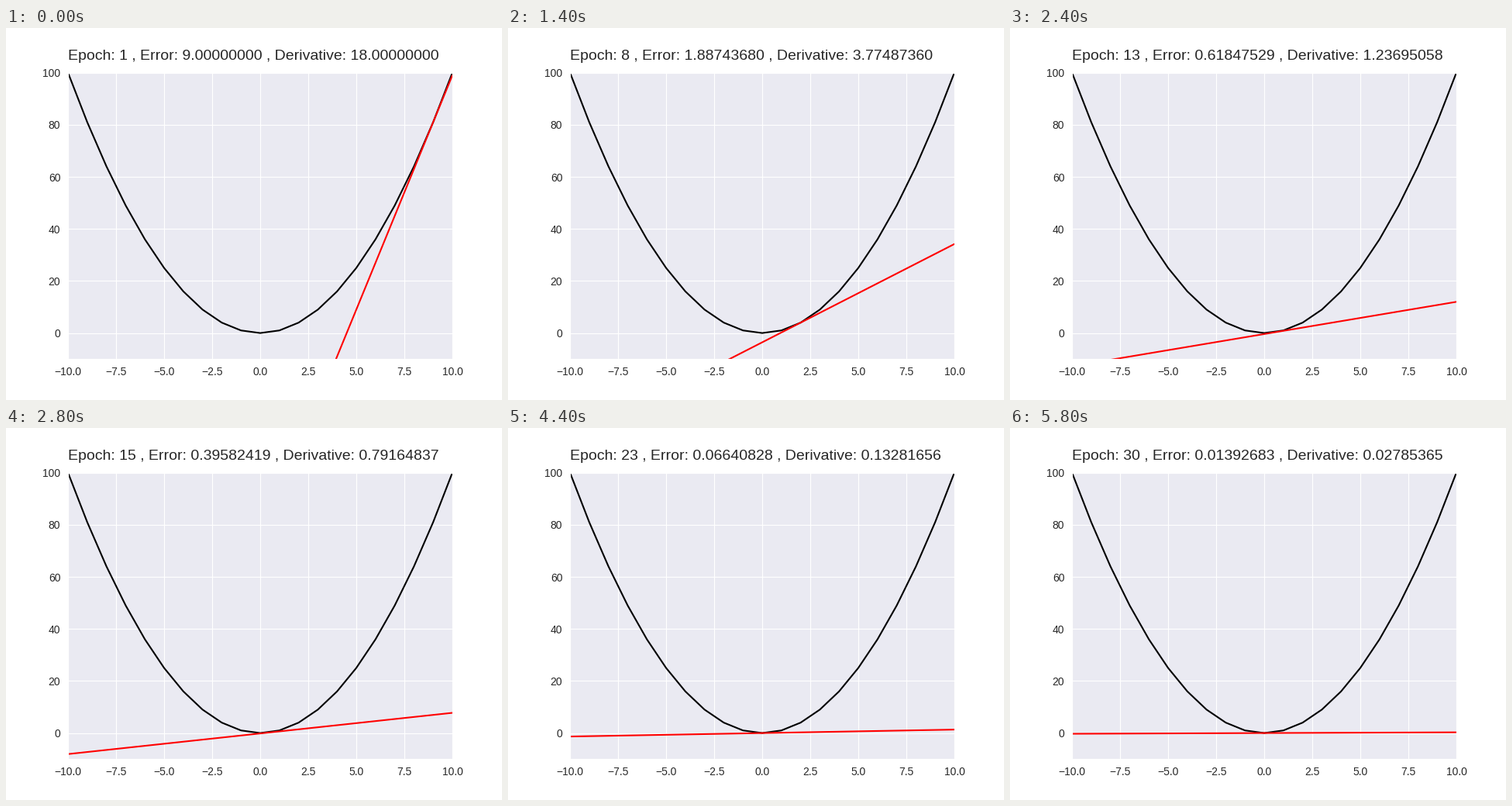
These frames come from a looping animation (640x480 px, 6 s). A matplotlib script:

```python
import numpy as np
import matplotlib.pyplot as plt
from matplotlib.animation import FuncAnimation

EPOCHS = 30
START, RATE = 9.0, 0.1

plt.rcParams.update({
    "font.family": "Liberation Sans",
    "font.size": 10,
    "text.color": ".15",
    "axes.facecolor": "#EAEAF2",
    "axes.edgecolor": "white",
    "axes.linewidth": 0.8,
    "axes.grid": True,
    "axes.axisbelow": True,
    "grid.color": "white",
    "grid.linewidth": 0.8,
    "xtick.color": ".15",
    "ytick.color": ".15",
    "xtick.bottom": False,
    "ytick.left": False,
    "lines.linewidth": 1.5,
    "lines.solid_capstyle": "round",
})

fig, ax = plt.subplots(figsize=(6.4, 4.8), dpi=100)
ax.set_xlim(-10, 10)
ax.set_ylim(-10, 100)

xs = np.arange(-10, 11)
ax.plot(xs, xs ** 2, color="black")
tangent, = ax.plot([], [], color="red")
title = ax.text(-10, 105, "", fontsize=14)


def update(i):
    # gradient descent on x^2: each step scales x by (1 - 2 * RATE)
    x = START * (1 - 2 * RATE) ** i
    slope = 2 * x
    tangent.set_data(xs, slope * (xs - x) + x ** 2)
    title.set_text(f"Epoch: {i + 1} , Error: {x:.8f} , Derivative: {slope:.8f}")
    return tangent, title


anim = FuncAnimation(fig, update, frames=EPOCHS, interval=200,
                     repeat=True, repeat_delay=0)
plt.show()
```
